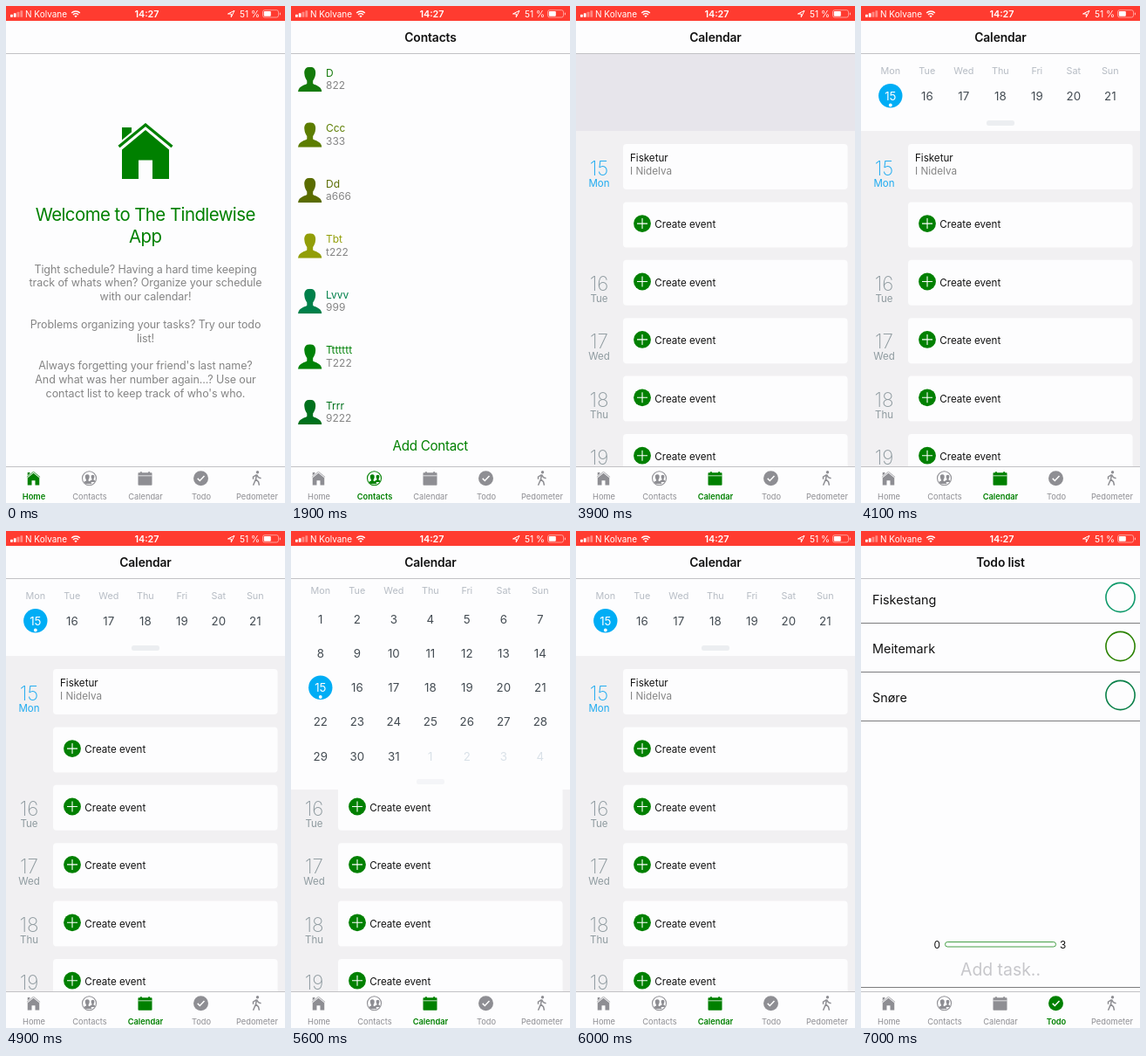
Write an HTML page that moves like this. It is 320 by 569 pixels and loops after 8000 ms.

```html
<!DOCTYPE html>
<html lang="en">
<head>
<meta charset="utf-8">
<title>Planner app</title>
<style>
  @property --open { syntax: "<number>"; inherits: true; initial-value: 0; }

  html, body { margin: 0; width: 100%; height: 100%; overflow: hidden; background: #fdfdfe; }
  svg.stage { display: block; width: 100%; height: 100%; font-family: Inter, Roboto, sans-serif; }

  .screen, .panel { animation: 8s step-end infinite; }
  #home { animation-name: home; }
  #contacts { animation-name: contacts; }
  #calendar { animation-name: calendar; }
  #todo { animation-name: todo; }
  .panel { animation-name: loaded, drag; }

  @keyframes home { 0% { opacity: 1 } 23.75%, 100% { opacity: 0 } }
  @keyframes contacts { 0% { opacity: 0 } 23.75% { opacity: 1 } 48.75%, 100% { opacity: 0 } }
  @keyframes calendar { 0% { opacity: 0 } 48.75% { opacity: 1 } 87.5%, 100% { opacity: 0 } }
  @keyframes todo { 0% { opacity: 0 } 87.5%, 100% { opacity: 1 } }
  @keyframes loaded { 0% { opacity: 0 } 50%, 100% { opacity: 1 } }
  @keyframes drag {
    0% { --open: 0 }
    67.5% { --open: .3 }
    68.75% { --open: .8 }
    70% { --open: 1 }
    71.25% { --open: .85 }
    72.5% { --open: .5 }
    73.75% { --open: .14 }
    75%, 100% { --open: 0 }
  }

  .sheet { transform: translateY(calc(var(--open) * 153px)); }
  .month { transform: translateY(calc(-76.5px - var(--open) * 76.5px)); }
  .week { transform: translateY(calc(var(--open) * -153px)); opacity: calc(1 - var(--open) * 1.72); }
  .knob { opacity: calc(1 - var(--open) * .5); }
</style>
</head>
<body>
<svg class="stage" viewBox="0 0 320 569">
  <defs>
    <symbol id="house" viewBox="0 0 64 64">
      <path d="M5 5h11v9L5 23z"/>
      <path d="M1.500 27 32 2l30.500 25" fill="none" stroke="#fdfdfe" stroke-width="7.500"/>
      <path d="M1.500 27 32 2l30.500 25" fill="none" stroke="currentColor" stroke-width="3.200"/>
      <path d="M32 8 59 30.500V64H40V42.500H24V64H5V30.500z"/>
    </symbol>
    <symbol id="person" viewBox="0 0 28 29">
      <path d="M14 0c-5 0-7 3.500-6.500 8 .3 4 1.800 6.500 3 8v3.500C9 21.500 1 21.500 0 29h28c-1-7.500-9-7.500-10.500-9.500V16c1.200-1.500 2.700-4 3-8C21 3.500 19 0 14 0z"/>
    </symbol>
    <clipPath id="badge"><circle r="7.500"/></clipPath>
    <clipPath id="sheetClip"><path d="M0-200h320v343H0z"/></clipPath>
  </defs>
  <g id="home" class="screen"></g>
  <g id="contacts" class="screen"></g>
  <g id="calendar" class="screen"></g>
  <g id="todo" class="screen"></g>
  <g id="status" fill="#fff"></g>
</svg>
<script>
const GREEN = '#008000', GREY = '#8e8e93', PAPER = '#fdfdfe', BLUE = '#00adf5', HAIRLINE = '#c2c2c5';

const rect = (x, y, w, h, fill, more = '') =>
  `<rect x="${x}" y="${y}" width="${w}" height="${h}" fill="${fill}" ${more}/>`;

// y is the middle of the capital letters
const text = (s, x, y, size, fill, { anchor = 'start', weight = 400, track = 0 } = {}) =>
  `<text x="${x}" y="${(y + size * .364).toFixed(2)}" font-size="${size}" fill="${fill}" ` +
  `text-anchor="${anchor}" font-weight="${weight}" letter-spacing="${track}">${s}</text>`;

const centred = (s, x, y, size, fill, style) => text(s, x, y, size, fill, { anchor: 'middle', ...style });
const icon = (id, x, y, w, h, color) =>
  `<use href="#${id}" x="${x}" y="${y}" width="${w}" height="${h}" fill="${color}" color="${color}"/>`;

const tabIcons = {
  Home: c => icon('house', -8, -8, 16, 16, c),
  Contacts: c => `<circle r="8" fill="none" stroke="${c}" stroke-width="1.1"/><g clip-path="url(#badge)">` +
    icon('person', 0, -4.5, 8, 9.5, c) + icon('person', -7.5, -5, 10.5, 12, c) + '</g>',
  Calendar: c => rect(-8, -6.5, 16, 14.5, c, 'rx=".8"') + rect(-8, -3.4, 16, 1, PAPER, 'opacity=".75"') +
    rect(-5.5, -7.5, 1.8, 2, c) + rect(3.7, -7.5, 1.8, 2, c),
  Todo: c => `<circle r="8.500" fill="${c}"/><path d="M-3.800.2-1.200 2.800 4-2.600" fill="none" stroke="#fff" stroke-width="1.500"/>`,
  Pedometer: c => `<circle cx="1" cy="-7" r="1.700" fill="${c}"/>` +
    `<path d="M0-4-1 1-4 8M-1 1 2 4 3 8M0-4-4-1.500V1M0-4 2-1 5 0" fill="none" stroke="${c}" stroke-width="1.500"/>`
};

const tabBar = active => rect(0, 527, 320, 42, PAPER) + rect(0, 527, 320, 1, HAIRLINE) +
  Object.entries(tabIcons).map(([name, draw], i) => {
    const color = name === active ? GREEN : GREY, x = 32 + 64 * i;
    return `<g transform="translate(${x - .5} 540.700)">${draw(color)}</g>` +
      centred(name, x, 561.9, 9.3, color, { weight: name === active ? 600 : 400 });
  }).join('');

const screen = (id, tab, title, body) => {
  document.getElementById(id).innerHTML = rect(0, 0, 320, 569, PAPER) + body +
    rect(0, 0, 320, 54, PAPER) + rect(0, 54, 320, 1, HAIRLINE) +
    centred(title, 160, 35.5, 13.8, '#111', { weight: 600, track: -.1 }) + tabBar(tab);
};

// Home
const intro = [
  'Tight schedule? Having a hard time keeping', 'track of whats when? Organize your schedule',
  'with our calendar!', '', 'Problems organizing your tasks? Try our todo', 'list!', '',
  "Always forgetting your friend's last name?", 'And what was her number again...? Use our',
  "contact list to keep track of who's who."
];
screen('home', 'Home', '',
  icon('house', 128, 134, 64, 64, GREEN) +
  ['Welcome to The Tindlewise', 'App'].map((s, i) =>
    centred(s, 159.7, 238.2 + 25.8 * i, 20.4, GREEN, { track: -.55 })).join('') +
  intro.map((s, i) => centred(s, 160, 301 + 15.8 * i, 12.5, '#858585', { track: -.08 })).join(''));

// Contacts
const people = [
  ['D', '822', '#147a0a'], ['Ccc', '333', '#5c7d00'], ['Dd', 'a666', '#5a6c00'], ['Tbt', 't222', '#929e08'],
  ['Lvvv', '999', '#00804a'], ['Ttttttt', 'T222', '#008208'], ['Trrr', '9222', '#00701c']
];
screen('contacts', 'Contacts', 'Contacts',
  people.map(([name, number, color], i) => {
    const y = 83.5 + 63.5 * i;
    return icon('person', 8, y - 13.8, 27.5, 28.5, color) +
      text(name, 40, y - 7, 12, color) + text(number, 40, y + 7.5, 12, '#858585');
  }).join('') +
  centred('Add Contact', 159.8, 503.6, 15.2, GREEN, { track: -.3 }));

// Calendar
const days = ['Mon', 'Tue', 'Wed', 'Thu', 'Fri', 'Sat', 'Sun'];
const column = i => 33.8 + 42 * i;
const weekdays = y => days.map((d, i) => centred(d, column(i), y, 10.8, '#b6bcc4')).join('');

const agenda = Array.from({ length: 6 }, (_, i) => {
  const y = 158 + 66.4 * i, mid = y + 24.7;
  const card = rect(54, y, 257.5, 52, PAPER, 'rx="4"');
  if (!i) return card + text('Fisketur', 62, 174, 11.6, '#111') + text('I Nidelva', 62, 188.5, 11.7, '#858585');
  return card + `<circle cx="76" cy="${mid}" r="9.900" fill="${GREEN}"/>` +
    `<path d="M70 ${mid}h12m-6-6v12" stroke="#fff" stroke-width="1.100"/>` +
    text('Create event', 90.3, y + 25.8, 11.6, '#111');
}).join('');

const dates = Array.from({ length: 5 }, (_, i) => {
  const y = i ? 251.5 + 66.4 * i : 185.7, color = i ? '#8e9a9f' : '#1fabf0';
  return centred(15 + i, 26.5, y, 22.5, color, { weight: 200 }) +
    centred(days[i], 26.5, y + 17, 11.5, color);
}).join('');

const month = Array.from({ length: 35 }, (_, i) => {
  const day = i % 31 + 1, x = column(i % 7), y = 100.7 + 39.3 * Math.floor(i / 7), today = i === 14;
  const mark = today ? `<circle cx="${x}" cy="${y}" r="13.700" fill="${BLUE}"/>` +
    `<circle cx="${x}" cy="${y + 10.7}" r="1.900" fill="#fff"/>` : '';
  return mark + centred(day, x, y, 13.3, today ? '#fff' : i > 30 ? '#d9e1e8' : '#434b52');
}).join('');

screen('calendar', 'Calendar', 'Calendar',
  rect(0, 55, 320, 472, '#f1f0f2') + agenda + dates + rect(0, 55, 320, 88, '#e7e5eb') +
  `<g class="panel">
    <g class="sheet" clip-path="url(#sheetClip)">
      ${rect(0, -200, 320, 343, PAPER)}
      <g class="month">${weekdays(68)}${month}</g>
      ${rect(0, 123, 320, 20, PAPER)}
      ${rect(144, 131, 32, 6, '#eceef1', 'rx="2.500" class="knob"')}
    </g>
    <g class="week">${rect(0, 55, 320, 32, PAPER)}${weekdays(74.5)}</g>
  </g>`);

// Todo
const tasks = [['Fiskestang', '#0f9a6b'], ['Meitemark', '#2a8200'], ['Snøre', '#0a8048']];
screen('todo', 'Todo', 'Todo list',
  tasks.map(([name, color], i) => {
    const y = 56 * i;
    return text(name, 13, y + 78.5, 14.4, '#111') + rect(0, y + 105, 320, 1, '#7c7c7e') +
      `<circle cx="297.500" cy="${y + 76}" r="16.600" fill="none" stroke="${color}" stroke-width="1.600"/>`;
  }).join('') +
  text('0', 83.5, 473.5, 11.8, '#111') + text('3', 228, 473.5, 11.8, '#111') +
  rect(96.5, 470.5, 127, 5.5, 'none', 'rx="2.700" stroke="#46a046"') +
  centred('Add task..', 160, 501.5, 19.4, '#c7c7cb') + rect(0, 522, 320, 1, '#7c7c7e'));

// Status bar
document.getElementById('status').innerHTML = rect(0, 0, 320, 17, '#ff3b30') +
  [3, 4.5, 6, 7.5].map((h, i) => rect(5 + 3.8 * i, 12.8 - h, 2.8, h, '#fff', `rx=".5" opacity="${i < 2 ? 1 : .4}"`)).join('') +
  text('N Kolvane', 22, 9.3, 10, '#fff') +
  '<g fill="none" stroke="#fff" stroke-width="1.400"><path d="M75.200 8.100a6.700 6.700 0 0 1 9.600 0M77 10a4.300 4.300 0 0 1 6 0"/></g>' +
  '<path d="M80 13.300 78.400 11.500a2.400 2.400 0 0 1 3.200 0z"/>' +
  centred('14:27', 161.5, 9, 10.8, '#fff', { weight: 600 }) +
  '<path d="M254.500 9 262 5.300 258.300 12.800V9z" fill="none" stroke="#fff"/>' +
  text('51 %', 268, 9, 10.2, '#fff') +
  rect(294.5, 4.7, 18, 8.3, 'none', 'rx="2.200" stroke="#fff" stroke-opacity=".55" stroke-width=".900"') +
  rect(295.8, 6, 8, 5.7, '#fff', 'rx="1"') + rect(313.8, 7.5, 1.2, 2.8, '#fff', 'rx=".6" opacity=".6"');
</script>
</body>
</html>
```
